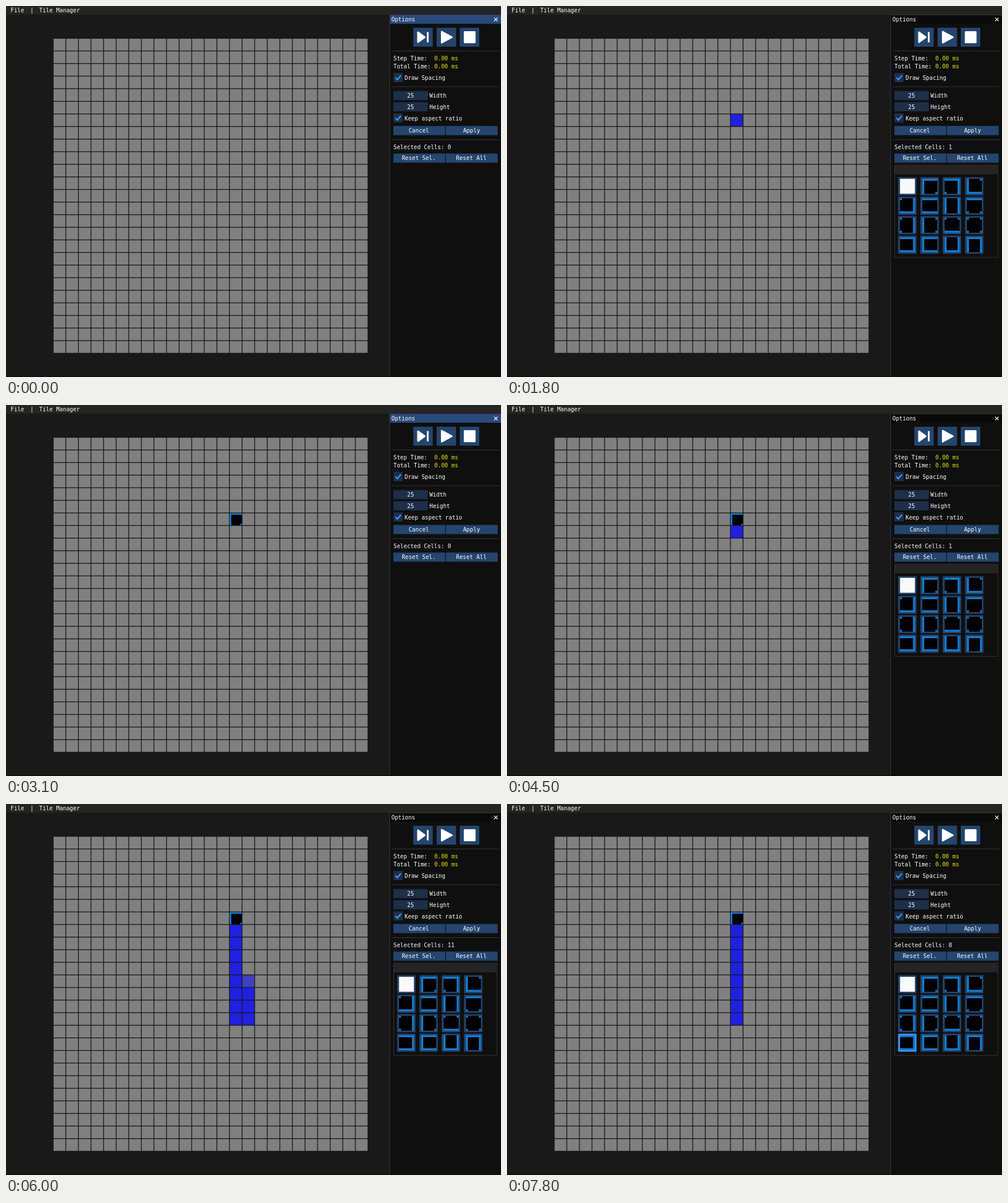
Write an HTML page that moves like this. It is 865 px wide and 648 px high and loops after 8 s.

```html
<!DOCTYPE html>
<html lang="en">
<head>
<meta charset="utf-8">
<title>Tile grid editor</title>
<style>
  html, body { margin: 0; width: 100%; height: 100%; overflow: hidden; background: #191919; }
  svg { display: block; width: 865px; height: 648px; }
  text { font: 9.85px "DejaVu Sans Mono", monospace; fill: #fff; white-space: pre; }
  .time { fill: #e8e800; }
  .btn { fill: #24456d; }
  .field { fill: #1d2f49; }
  .line { fill: #37373d; }
  .edge { fill: #1080d8; }
  .check { fill: none; stroke: #4296fa; stroke-width: 2.2; }
  .icon { fill: #fff; stroke: #fff; stroke-width: 3; stroke-linejoin: round; }
</style>
</head>
<body>
<svg id="stage" viewBox="0 0 865 648"></svg>
<script>
const LOOP = 8000, SIZE = 25, PITCH = 22, LEFT = 83, TOP = 57;
const GRAY = '#808080', HOVER = '#4040c0', SELECTED = '#2020e0';
const stage = document.getElementById('stage');

function add(parent, name, attrs, content) {
  const el = document.createElementNS('http://www.w3.org/2000/svg', name);
  for (const key in attrs) el.setAttribute(key, attrs[key]);
  if (content !== undefined) el.textContent = content;
  parent.appendChild(el);
  return el;
}
const box = (parent, x, y, width, height, attrs) =>
  add(parent, 'rect', { x, y, width, height, ...attrs });
const label = (x, y, content, attrs) => add(stage, 'text', { x, y, ...attrs }, content);
const show = (el, on) => { el.style.display = on ? '' : 'none'; };

// Edges are a string of t, r, b, l; every tile also has its four corners.
function drawTile(parent, x, y, s, edges) {
  const w = s / 8, far = s - w;
  box(parent, x, y, s, s, { fill: '#000' });
  for (const dx of [0, far])
    for (const dy of [0, far]) box(parent, x + dx, y + dy, w, w, { class: 'edge' });
  const bars = { t: [0, 0, s, w], r: [far, 0, w, s], b: [0, far, s, w], l: [0, 0, w, s] };
  for (const e of edges) {
    const [dx, dy, bw, bh] = bars[e];
    box(parent, x + dx, y + dy, bw, bh, { class: 'edge' });
  }
}

// Menu bar
box(stage, 0, 0, 865, 15, { fill: '#242424' });
label(8, 11, 'File');
label(42.3, 11, '|');
label(58, 11, 'Tile Manager');

// Grid
const cells = [];
for (let row = 0; row < SIZE; row++)
  for (let col = 0; col < SIZE; col++)
    cells.push(box(stage, LEFT + col * PITCH + 0.2, TOP + row * PITCH + 0.2, 20.6, 20.6, { fill: GRAY }));
const cellAt = ([col, row]) => cells[row * SIZE + col];
const placed = add(stage, 'g', {});
drawTile(placed, LEFT + 14 * PITCH, TOP + 6 * PITCH, 21, 'tl');

// Options window
box(stage, 670, 15, 195, 633, { fill: '#0f0f0f' });
const title = box(stage, 671, 16, 194, 15, {});
box(stage, 670, 15, 1, 633, { class: 'line' });
box(stage, 670, 15, 195, 1, { class: 'line' });
box(stage, 0, 647, 865, 1, { fill: '#0d0709' });
label(673.5, 27, 'Options');
add(stage, 'path', { d: 'M853 20.5l6 6m0-6l-6 6', stroke: '#fff', 'stroke-width': 1.1 });

for (const x of [711.7, 752.5, 793]) box(stage, x, 38, 34, 33, { class: 'btn' });
add(stage, 'path', { class: 'icon', d: 'M720 46V63L731.500 54.500ZM737 45.500V63.500' });
add(stage, 'path', { class: 'icon', d: 'M761.500 45V64L779 54.500Z' });
box(stage, 801.5, 45.5, 17.5, 18, { class: 'icon' });

for (const y of [78, 140.5, 233]) box(stage, 674, y, 187, 1, { class: 'line' });

label(677, 95, 'Step Time:');
label(748.6, 95, '0.00 ms', { class: 'time' });
label(677, 109.4, 'Total Time:');
label(748.6, 109.4, '0.00 ms', { class: 'time' });

function checkbox(y, name) {
  box(stage, 677, y, 16, 16, { class: 'field' });
  add(stage, 'path', { class: 'check', d: `M680.500 ${y + 8}l3.300 3.700l6.300-7.500` });
  label(696.5, y + 12, name);
}
function field(y, name) {
  box(stage, 677, y, 60, 16, { class: 'field' });
  label(701, y + 11.5, '25');
  label(740, y + 11.5, name);
}
function button(x, y, textX, name) {
  box(stage, x, y, 90.5, 16, { class: 'btn' });
  label(textX, y + 11.3, name);
}
checkbox(117, 'Draw Spacing');
field(148.5, 'Width');
field(168, 'Height');
checkbox(187.5, 'Keep aspect ratio');
button(677, 209.5, 703.7, 'Cancel');
button(768.7, 209.5, 798.7, 'Apply');
const counter = label(677, 250, '');
button(677, 257.7, 691.7, 'Reset Sel.');
button(768.7, 257.7, 786.5, 'Reset All');

// Tile palette
const palette = add(stage, 'g', {});
box(palette, 677.5, 278, 180.5, 161, { fill: '#0f0f0f', stroke: '#37373d' });
box(palette, 678, 278.5, 179.5, 14, { fill: '#242424' });
box(palette, 678, 292.5, 179.5, 1, { class: 'line' });
const kinds = 'white tl tr bl rb tb lr t r l b - trb tbl lbr tlr'.split(' ');
const slots = kinds.map((kind, i) => {
  const x = 683.5 + (i % 4) * 39, y = 299.2 + (i >> 2) * 34;
  const frame = box(palette, x, y, 32, 31.4, {});
  if (kind === 'white') box(palette, x + 3.3, y + 2.7, 26, 26, { fill: '#f9f9f9' });
  else drawTile(palette, x + 3.3, y + 2.7, 26, kind.replace('-', ''));
  return frame;
});

// Cells in the order the drag picks them; removal runs backwards.
const trail = [];
for (let row = 7; row <= 14; row++) trail.push([14, row]);
for (let row = 14; row >= 12; row--) trail.push([15, row]);

// time, selected count, hovered cell, hovered palette slot
const steps = [
  [0, 0], [500, 0, [20, 6]], [600, 0], [800, 0, [15, 6]], [900, 0, [14, 6]],
  [1800, 1], [2200, 1, null, 4], [2400, 1], [2500, 1, null, 1],
  [3100, 0], [3300, 0, [19, 9]], [3400, 0, [15, 8]], [3600, 0, [14, 8]], [3700, 0, [14, 7]],
  [4500, 1], [4600, 2], [4700, 3], [4800, 4],
  [5000, 5], [5100, 7], [5200, 8], [5300, 9], [5400, 10], [5500, 11],
  [6000, 11, [15, 11]], [6300, 10, [15, 12]], [6400, 8, [15, 14]], [6500, 8, [15, 15]], [6800, 8],
  [7000, 8, null, 4], [7100, 8, null, 5], [7200, 8], [7300, 8, null, 9], [7400, 8, null, 13],
  [7800, 8, null, 12]
];
const PRESS = 3000, APPLY = 3100;

let painted = [];
function render(t) {
  const [, count, hovered, slot] = steps.findLast(s => s[0] <= t);
  const chosen = t < APPLY ? [[14, 6]] : trail;
  const pressed = t >= PRESS && t < APPLY;

  painted.forEach(c => c.setAttribute('fill', GRAY));
  painted = chosen.slice(0, count).map(cellAt);
  painted.forEach(c => c.setAttribute('fill', SELECTED));
  if (hovered) {
    const c = cellAt(hovered);
    c.setAttribute('fill', HOVER);
    painted.push(c);
  }

  show(placed, t >= APPLY);
  show(palette, count > 0);
  title.setAttribute('fill', count && !pressed ? '#0a0a0a' : '#294a7a');
  counter.textContent = 'Selected Cells: ' + count;
  slots.forEach((s, i) =>
    s.setAttribute('fill', i !== slot ? '#24456d' : pressed ? '#0f87fa' : '#4296fa'));
}

const start = performance.now();
let last = -1;
function tick() {
  const t = (performance.now() - start) % LOOP;
  const slice = Math.floor(t / 100);
  if (slice !== last) render(slice * 100);
  last = slice;
  requestAnimationFrame(tick);
}
tick();
</script>
</body>
</html>
```
